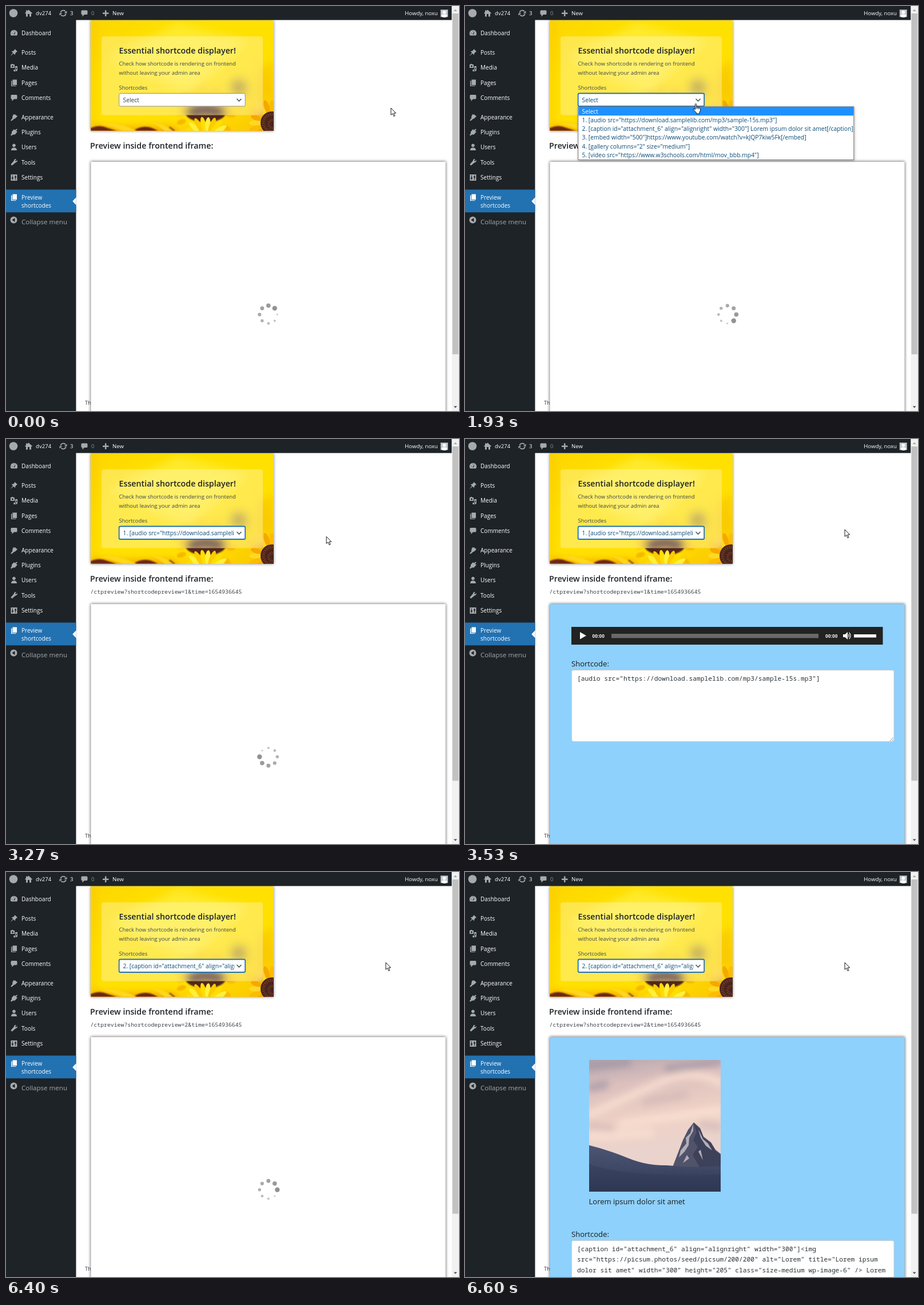
Write an HTML page that moves like this. It is 792 by 707 pixels and loops after 8 s.

```html
<!DOCTYPE html>
<html lang="en">
<head>
<meta charset="utf-8">
<title>Shortcode preview</title>
<style>
html, body { margin: 0; width: 100%; height: 100%; overflow: hidden; background: #fff; }
svg { display: block; width: 792px; height: 707px; }
text { font: 9.45px "Open Sans", "Noto Sans", sans-serif; fill: #3c434a; white-space: pre; }
.bar text { font-size: 9.6px; font-weight: 500; fill: #fff; }
.bar path, .icon { fill: #a7aaad; fill-rule: evenodd; }
.menu text { font-size: 10.05px; font-weight: 500; fill: #fff; }
.head { font-size: 14.25px; font-weight: 600; fill: #1d2327; }
.mono { font-family: "Noto Sans Mono", "DejaVu Sans Mono", monospace; font-size: 9.82px; }
.code { font-size: 11.24px; fill: #2c3338; }
.pick { font-size: 10.33px; fill: #0a4b78; }
.body { font-size: 13.05px; fill: #1a1a1a; }
.time { font: bold 8.4px "Liberation Sans", Arial, sans-serif; fill: #fff; }
.area { fill: #fff; stroke: #ccc; }
</style>
</head>
<body>
<svg viewBox="0 0 792 707" xmlns="http://www.w3.org/2000/svg">
  <defs>
    <linearGradient id="yellow" x2="1" y2=".9">
      <stop offset="0" stop-color="#fdd600"/><stop offset=".3" stop-color="#ffe100"/>
      <stop offset=".75" stop-color="#ffe000"/><stop offset="1" stop-color="#fbc800"/>
    </linearGradient>
    <linearGradient id="sky" x2=".15" y2="1">
      <stop offset="0" stop-color="#b5a6ae"/><stop offset=".22" stop-color="#dcc0bd"/>
      <stop offset=".5" stop-color="#efd1c5"/><stop offset=".72" stop-color="#ead3cc"/>
    </linearGradient>
    <linearGradient id="dune" x2="0" y2="1">
      <stop offset="0" stop-color="#4c5674"/><stop offset=".5" stop-color="#3f4966"/>
      <stop offset="1" stop-color="#2a324c"/>
    </linearGradient>
    <filter id="soft" x="-30%" y="-30%" width="160%" height="160%"><feGaussianBlur stdDeviation="7"/></filter>
    <filter id="haze" x="-20%" y="-20%" width="140%" height="140%"><feGaussianBlur stdDeviation="6"/></filter>
    <filter id="edge"><feGaussianBlur stdDeviation="1.1"/></filter>
    <filter id="shade" x="-5%" y="-5%" width="110%" height="110%"><feGaussianBlur stdDeviation="2.6"/></filter>
    <clipPath id="cardClip"><path d="M148 25H468V218H148Z"/></clipPath>
    <clipPath id="panelClip"><rect x="167" y="53" width="282" height="137.500" rx="4"/></clipPath>
    <clipPath id="pickClip"><path d="M199 154H399.500V174H199Z"/></clipPath>
    <clipPath id="photoClip"><path d="M217 328H447V558H217Z"/></clipPath>
  </defs>

  <path fill="#fff" d="M0 0H792V707H0Z"/>
  <text x="138" y="695.500" font-style="italic" fill="#50575e">Thank</text>

  <!-- card -->
  <rect x="148" y="25" width="320" height="193" fill="#000" opacity=".5" filter="url(#shade)"/>
  <g clip-path="url(#cardClip)">
    <g id="photo">
      <path fill="url(#yellow)" d="M148 25H468V218H148Z"/>
      <g filter="url(#soft)">
        <path fill="#f5bd00" opacity=".5" d="M148 25H158L155 200 148 218ZM440 110 468 95V160L440 160Z"/>
        <path fill="#fff04a" opacity=".6" d="M180 90 300 30 420 60 320 150Z"/>
        <path fill="#f7a600" d="M148 208 200 212 290 210 310 222V228H148Z"/>
        <circle cx="407" cy="142" r="13" fill="#96761b"/>
      </g>
      <g filter="url(#edge)">
        <ellipse cx="349" cy="185" rx="36" ry="18" fill="#52281f"/>
        <g id="far"></g>
        <path fill="#6b2615" d="M148 213Q163 206 178 213L194 218H148ZM222 218Q240 206 258 214L266 218ZM272 218 287 211 296 218Z"/>
        <path fill="#ffd81a" d="M165 205Q196 201 228 218H205Q185 210 165 205ZM250 203Q275 203 292 218H276Q268 208 250 203Z"/>
      </g>
      <g id="near"></g>
      <g id="right"></g>
      <circle cx="465" cy="204" r="20" fill="#4a241b"/>
      <circle cx="465" cy="204" r="15" fill="none" stroke="#754229" stroke-width="5" stroke-dasharray="1.500 2"/>
      <circle cx="466" cy="206" r="7" fill="none" stroke="#754229" stroke-width="4" stroke-dasharray="1.500 2"/>
    </g>
    <g clip-path="url(#panelClip)">
      <use href="#photo" filter="url(#soft)"/>
      <path fill="#fff" opacity=".3" d="M167 53H449V191H167Z"/>
    </g>
  </g>
  <text class="head" x="197.500" y="83">Essential shortcode displayer!</text>
  <text x="197.500" y="104">Check how shortcode is rendering on frontend</text>
  <text x="197.500" y="119.500">without leaving your admin area</text>
  <text x="197.500" y="145.500">Shortcodes</text>
  <rect id="field" x="197.700" y="152.500" width="220.500" height="22.500" rx="2.300" fill="#fff"/>
  <text id="picked" class="pick" x="204.500" y="167.600" clip-path="url(#pickClip)"></text>
  <path d="M403.500 162 407.500 166 411.500 162" fill="none" stroke="#50575e" stroke-width="1.600"/>

  <text class="head" x="147" y="249">Preview inside frontend iframe:</text>
  <text id="address" class="mono" x="147.500" y="270"></text>

  <!-- frame -->
  <g id="frame">
    <rect x="148" y="271.500" width="621" height="460" fill="#000" opacity=".6" filter="url(#shade)"/>
    <rect id="page" x="148.500" y="272" width="620" height="460"/>
    <g id="spinner"></g>
  </g>

  <g id="audio">
    <path fill="#222" d="M186 328H730.500V359H186Z"/>
    <path fill="#fff" d="M201 337 212 343.300 201 349.500ZM680 341H719V346.500H680Z"/>
    <text class="time" x="222.500" y="347">00:00</text>
    <path fill="#696969" d="M256 340H618V347.500H256Z"/>
    <text class="time" x="630" y="347">00:00</text>
    <path fill="#fff" d="M661 341H664.500L669 337V350L664.500 346H661Z"/>
    <path fill="none" stroke="#fff" stroke-width="1.300" d="M670.500 341Q672.300 343.500 670.500 346M671.500 338Q677 343.500 671.500 349"/>
    <text class="body" x="186" y="397">Shortcode:</text>
    <rect class="area" x="186.500" y="403.500" width="563.500" height="124.500" rx="3"/>
    <path stroke="#777" stroke-width=".8" d="M743 527 749 521M746.500 527 749 524.500"/>
    <text class="mono code" x="196" y="422">[audio src="https://download.samplelib.com/mp3/sample-15s.mp3"]</text>
  </g>

  <g id="caption">
    <g clip-path="url(#photoClip)">
      <path fill="url(#sky)" d="M217 328H447V558H217Z"/>
      <g filter="url(#haze)" fill="none" stroke-width="15">
        <path stroke="#9a92a2" opacity=".6" d="M210 340 290 332M350 345 450 330M215 378 250 370"/>
        <path stroke="#fae0d3" opacity=".75" d="M215 425Q280 395 340 368T450 370M270 440 450 415M215 462 330 455"/>
        <path stroke="#c9b1b3" opacity=".5" d="M310 402 390 388M215 442 260 448M410 440 450 447"/>
      </g>
      <path fill="#50536a" d="M361 520 371 494 381 468 390 450 400 437 411 447 417 462 430 472 438 485 447 492V530H361Z"/>
      <path fill="#3d4159" d="M400 439 405 454 399 468 407 480 398 494 410 515 447 520V494L438 487 430 473 417 464 411 449Z"/>
      <g fill="#b3adb8">
        <path d="M399 440 394 456 386 464 387 474 377 486 374 498 384 488 391 477 392 464 399 452Z"/>
        <path d="M408 449 412 464 421 478 432 486 425 474 416 466ZM408 488 416 503 412 485ZM388 494 381 508 392 500Z"/>
      </g>
      <path fill="url(#dune)" d="M217 477Q250 485 284 499T352 512Q400 517 447 513V558H217Z"/>
      <path fill="#333c58" opacity=".5" d="M217 510Q290 535 447 528V558H217Z"/>
    </g>
    <text class="body" x="216.500" y="580">Lorem ipsum dolor sit amet</text>
    <text class="body" x="186" y="637">Shortcode:</text>
    <rect class="area" x="186.500" y="643.500" width="563.500" height="124.500" rx="3"/>
    <text class="mono code" x="196" y="662">[caption id="attachment_6" align="alignright" width="300"]&lt;img</text>
    <text class="mono code" x="196" y="680.400">src="https://picsum.photos/seed/picsum/200/200" alt="Lorem" title="Lorem ipsum</text>
    <text class="mono code" x="196" y="698.800">dolor sit amet" width="300" height="205" class="size-medium wp-image-6" /&gt; Lorem</text>
  </g>

  <g id="list">
    <rect x="198" y="177" width="483" height="93" fill="#000" opacity=".3" filter="url(#shade)"/>
    <rect x="197.800" y="175.800" width="482" height="92.700" fill="#fff" stroke="#767676"/>
    <rect id="mark" x="198.300" width="481" height="15.300" fill="#1e90ff"/>
  </g>

  <!-- side menu, top bar, scrollbar -->
  <g class="menu" id="menu">
    <path fill="#1d2327" d="M0 0H122.500V707H0Z"/>
    <path fill="#2271b1" d="M0 320.500H122.500V360.200H0Z"/>
    <path fill="#fff" d="M122.600 334V347.500L116.300 340.700Z"/>
    <text x="27" y="351.500">shortcodes</text>
    <text x="27" y="380.500" style="font-size:11.55px;font-weight:400;fill:#a7aaad">Collapse menu</text>
    <circle class="icon" cx="13.500" cy="373.500" r="6"/>
    <path fill="#1d2327" d="M15.500 370V377L10.500 373.500Z"/>
  </g>
  <g class="bar">
    <rect width="779.500" height="24.500" fill="#1d2327"/>
    <circle cx="13" cy="12.500" r="7.300" fill="#a7aaad"/>
    <path d="M39.500 6.500 46 12.500 45 13.500 44 12.700V18.500H41V14H38V18.500H35V12.700L34 13.500 33 12.500 35 10.700V7.500H37V8.800Z"/>
    <text x="52" y="16">dv274</text>
    <g fill="none" stroke="#a7aaad" stroke-width="1.700">
      <path style="fill:none" d="M95.500 11.500A4.800 4.800 0 0 1 104 9.500M104.800 13.500A4.800 4.800 0 0 1 96.300 15.500"/>
    </g>
    <path d="M106.500 8.500V12.500H101.500ZM93.500 16.500V12.500H98.500Z"/>
    <text x="112" y="16">3</text>
    <path id="note" transform="translate(137 12.500)"/>
    <text x="149" y="16" style="fill:#8c8f94">0</text>
    <path d="M173 7.500H175.500V11.500H179.500V14H175.500V18H173V14H169V11.500H173Z"/>
    <text x="186" y="16">New</text>
    <text x="755" y="16" text-anchor="end">Howdy, noxu</text>
    <rect x="760" y="6.500" width="12.500" height="12.500" fill="#c9cacd" stroke="#8c8f94" stroke-width=".8"/>
    <circle cx="766.300" cy="11" r="2.800" fill="#fff"/>
    <ellipse cx="766.300" cy="17.300" rx="4.900" ry="2.700" fill="#fff"/>
  </g>
  <path fill="#f1f1f1" d="M779.500 0H792V707H779.500Z"/>
  <rect id="thumb" x="780.500" y="13" width="10.500" fill="#c1c1c1"/>
  <path fill="#a3a3a3" d="M782.700 9H788.700L785.700 5.800Z"/>
  <path fill="#505050" d="M782.700 698.500H788.700L785.700 701.700Z"/>

  <g fill="#fff" stroke="#000" stroke-linejoin="round">
    <path id="arrow" d="M0 0V12.300L2.900 9.700 5 14.600 7 13.700 4.900 9H8.700Z" stroke-width=".9"/>
    <path id="hand" d="M1.300.8Q2.600-.4 3.500 1V6.500Q4.700 5.400 5.800 6.700 7 5.900 8 7.200 9.500 6.600 10.300 8.300V12.500L8.800 15.500V17.800H3.300V16L-1.800 10.700Q-2.500 8.800-.3 9.200L1.300 10.600ZM3.500 6.500V9.500M5.800 6.700V9.700M8 7.200V9.900" stroke-width=".9"/>
  </g>
</svg>
<script>
const $ = id => document.getElementById(id);
const make = (parent, tag, attrs, content) => {
  const el = document.createElementNS('http://www.w3.org/2000/svg', tag);
  for (const name in attrs) el.setAttribute(name, attrs[name]);
  if (content) el.textContent = content;
  return $(parent).appendChild(el);
};
const set = (id, name, value) => $(id).setAttribute(name, value);
const show = (id, on) => { $(id).style.display = on ? '' : 'none'; };

const comment = 'M-4-5H4Q5.5-5 5.5-3.5V1Q5.5 2.5 4 2.5H0L-3.5 6V2.5H-4Q-5.5 2.5-5.5 1V-3.5Q-5.5-5-4-5Z';
const pages = 'M-2.5-5.5H5V4H-2.5ZM-5-3.5H-3.5V5H3.5V6H-5Z';
set('note', 'd', comment);
[
  ['Dashboard', 47, 'M-5 4.5A6.2 6.2 0 1 1 5 4.5ZM-.8 2 2.8-3 1 2.6ZM-4 0H-3V1H-4ZM-.5-4H.5V-3H-.5Z'],
  ['Posts', 81, 'M1.5-6 6-1.5 4.5-.8 2.3 1.4 2 4.5-.8 1.8-5.5 5.8-5.8 5.5-1.8 .8-4.5-2-1.4-2.3 .8-4.5Z'],
  ['Media', 107, 'M-6-5H-4.5L-4-6H-2L-1.5-5H1V1H-6ZM-4-2A1.5 1.5 0 1 0-1-2 1.5 1.5 0 1 0-4-2ZM2-2H6V5A2 1.7 0 1 1 4.8 3.4V.5H3.2V5.5A2 1.7 0 1 1 2 4Z'],
  ['Pages', 134, pages],
  ['Comments', 160, comment],
  ['Appearance', 194.5, 'M-1-6 0-4.5 1.5-5.5 6-2 2 2 .5 2.3-4 6-6 5.5-2.5 1-3-.5Z'],
  ['Plugins', 220.5, 'M6-5 3.5-2.5 6-1 1.5 4-2 4-4.5 6-6 4.5-4 2-4-1 0-5.5 1.5-3.7 4.5-6Z'],
  ['Users', 246.5, 'M0-6A2.9 2.9 0 1 1-.1-6ZM-5 5.5Q-5 .8 0 .8 5 .8 5 5.5Z'],
  ['Tools', 273, 'M5.8-4 3.6-2 2-3.6 4-5.8Q.5-6.5-.2-2.8L-5.6 3.5-3.5 5.6 2.8 .2Q6.5-.5 5.8-4Z'],
  ['Settings', 299.5, 'M-5.5-5.5H5.5V5.5H-5.5ZM-3-4H-2V0H-1V2H-2V4H-3V2H-4V0H-3ZM2-4H3V-2H4V0H3V4H2V0H1V-2H2Z'],
  ['Preview', 334, pages]
].forEach(([label, y, d]) => {
  const icon = make('menu', 'path', { d, class: 'icon', transform: `translate(14 ${y})` });
  if (label === 'Preview') icon.style.fill = '#fff';
  make('menu', 'text', { x: 27, y: y + 3.7 }, label);
});

// A ring of petals around a flower head
function petals(id, x, y, inner, outer, count, colors) {
  for (let i = 0; i < count; i++) {
    const mid = (inner + outer) / 2, len = (outer - inner) / 2 * (0.88 + 0.12 * Math.sin(i * 5));
    make(id, 'ellipse', {
      cx: mid, rx: len, ry: 4.6, fill: colors[i % colors.length],
      transform: `translate(${x} ${y}) rotate(${i * 360 / count})`
    });
  }
}
petals('far', 349, 190, 34, 54, 22, ['#f8b800', '#ffd400']);
petals('near', 351, 232, 8, 42, 21, ['#ffde00', '#fff03c', '#fccb00']);
petals('right', 465, 204, 15, 42, 20, ['#fcbc00', '#ffd826', '#f5a800']);

const options = [
  'Select',
  '1. [audio src="https://download.samplelib.com/mp3/sample-15s.mp3"]',
  '2. [caption id="attachment_6" align="alignright" width="300"] Lorem ipsum dolor sit amet[/caption]',
  '3. [embed width="500"]https://www.youtube.com/watch?v=kJQP7kiw5Fk[/embed]',
  '4. [gallery columns="2" size="medium"]',
  '5. [video src="https://www.w3schools.com/html/mov_bbb.mp4"]'
];
const rowHeight = 15.3, listTop = 176;
const rows = options.map((label, i) =>
  make('list', 'text', { class: 'pick', x: 204.5, y: listTop + 11.5 + i * rowHeight }, label));

const dots = Array.from({ length: 8 }, (_, i) => make('spinner', 'circle', {
  cx: 458.8 + 15.5 * Math.sin(i * Math.PI / 4),
  cy: 538.6 - 15.5 * Math.cos(i * Math.PI / 4)
}));

// Pointer stops: step, x, y
const stops = [[10, 673, 178], [20, 410, 164], [26, 410, 164], [36, 369, 193], [43, 369, 193], [53, 664, 158]];
function pointer(step) {
  const next = stops.findIndex(s => s[0] > step);
  if (next === 0) return stops[0].slice(1);
  if (next < 0) return stops[stops.length - 1].slice(1);
  const [a, x, y] = stops[next - 1], [b, u, v] = stops[next];
  const p = (step - a) / (b - a), e = p * p * (3 - 2 * p);
  return [x + (u - x) * e, y + (v - y) * e];
}

function spinnerHead(step) {
  if (step < 11) return step < 1 ? 1 : 2;
  if (step < 96) return 3 + Math.round((step - 21) * 18 / 19);
  return step - 94;
}

let last = -1;
function draw(time) {
  const step = Math.floor((time % 8000 + 3.5) * 15 / 1000);
  if (step !== last) render(last = step);
  requestAnimationFrame(draw);
}

function render(step) {
  const choice = step < 44 ? 0 : step < 92 ? 1 : 2;
  const open = step >= 24 && step < 44;
  const loading = step < 52 || (step >= 96 && step < 99);
  const [x, y] = pointer(step);

  $('picked').textContent = options[choice];
  $('picked').style.fill = step < 22 ? '#3c434a' : step < 24 ? '#2271b1' : '#0a4b78';
  set('field', 'stroke', step < 24 ? '#8c8f94' : '#2271b1');
  set('field', 'stroke-width', step < 24 ? 1 : 1.8);
  $('address').textContent = choice ? `/ctpreview?shortcodepreview=${choice}&time=1654936645` : '';
  set('frame', 'transform', `translate(0 ${choice ? 16.2 : 0})`);
  set('page', 'fill', loading ? '#fff' : '#8ed1fc');
  set('thumb', 'height', choice ? 583.5 : 595);
  show('spinner', loading);
  show('audio', !loading && step < 96);
  show('caption', step >= 99);

  show('list', open);
  const over = Math.max(0, Math.min(5, Math.floor((y - listTop) / rowHeight)));
  set('mark', 'y', listTop + over * rowHeight);
  rows.forEach((row, i) => { row.style.fill = i === over ? '#fff' : ''; });

  const head = spinnerHead(step);
  dots.forEach((dot, i) => {
    const lag = ((head - i) % 8 + 8) % 8, tone = 146 + lag * 8;
    dot.setAttribute('r', 4.2 - lag * 0.37);
    dot.setAttribute('fill', `rgb(${tone},${tone},${tone})`);
  });

  const onField = x > 197 && x < 418 && y < 175 && step < 44;
  show('hand', onField);
  show('arrow', !onField);
  set(onField ? 'hand' : 'arrow', 'transform', `translate(${x} ${y})`);
}
draw(performance.now());
</script>
</body>
</html>
```
